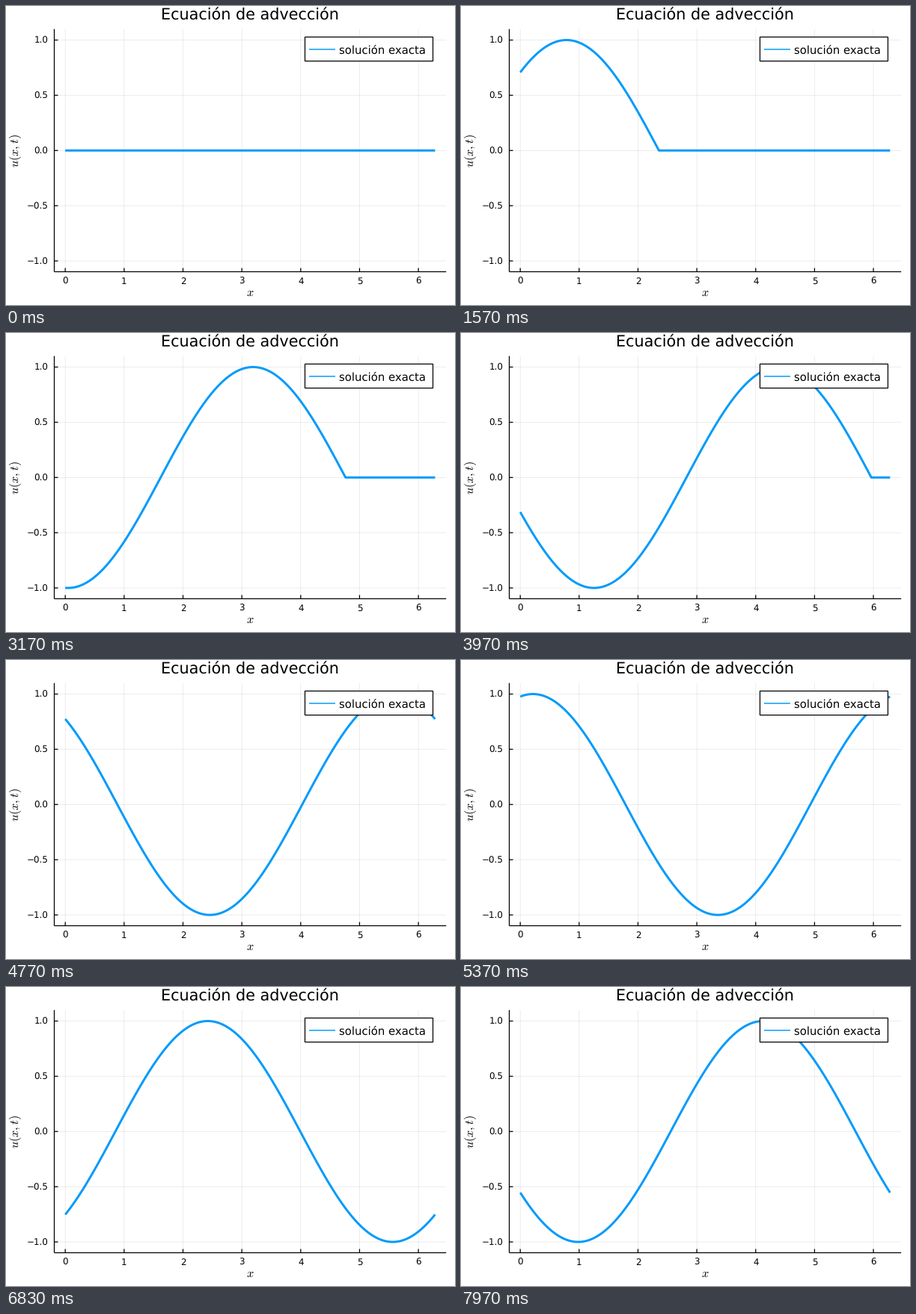
Animation, 600 px wide and 400 px high, one loop 8 s. Source, as a matplotlib script:

```python
import numpy as np
import matplotlib.pyplot as plt
from matplotlib.animation import FuncAnimation
from matplotlib.patches import Rectangle

W, H, DPI = 600, 400, 100
LOOP, TICK = 8000, 20   # ms
STEPS = 240             # time steps of the wave in one loop
DT = 20 / 399
BLUE = "#009afa"
PX = 72 / DPI

plt.rcParams.update({
    "font.family": "DejaVu Sans",
    "mathtext.fontset": "cm",
    "text.hinting": "none",
    "path.simplify": False,
    "path.snap": False,
})

fig = plt.figure(figsize=(W / DPI, H / DPI), dpi=DPI, facecolor="white")
ax = fig.add_axes([0, 0, 1, 1])
ax.set(xlim=(0, W), ylim=(H, 0))
ax.axis("off")

LEFT, RIGHT, TOP, BOTTOM = 64.5, 588.2, 30.8, 355.5
EDGE = 1.25


def sx(x):
    return 79.2 + 78.65 * x


def sy(u):
    return 193.3 - 147.75 * u


def line(xs, ys, color="black", width=EDGE, z=2, **kw):
    return ax.plot(xs, ys, color=color, lw=width * PX, zorder=z,
                   solid_capstyle="butt", **kw)[0]


def grid_line(xs, ys):
    line(xs, ys, width=0.74, z=1, alpha=0.1)


def label(x, y, s, size, ha="center", va="baseline", **kw):
    ax.text(x, y, s, fontsize=size * PX, ha=ha, va=va, zorder=6, **kw)


# grid, ticks and tick labels
for k in range(7):
    x = sx(k)
    grid_line([x, x], [TOP, BOTTOM])
    line([x, x], [BOTTOM, BOTTOM - 5])
    label(x, 372, str(k), 11.85)
for u in (-1.0, -0.5, 0.0, 0.5, 1.0):
    y = sy(u)
    grid_line([LEFT, RIGHT], [y, y])
    line([LEFT, LEFT + 5], [y, y])
    label(56.3, y + 4.4, f"{u:.1f}".replace("-", "\u2212"), 11.85, ha="right")

line([LEFT, RIGHT], [BOTTOM, BOTTOM])
line([LEFT, LEFT], [TOP, BOTTOM])

label(326.3, 18.3, "Ecuación de advección", 20.75)
label(325.8, 388, "$x$", 16.3)
label(13.3, 193.5, "$u(x,t)$", 16.3, va="center", rotation=90)

# legend
ax.add_patch(Rectangle((399.5, 41.5), 171, 32.2, fc="white", ec="black",
                       lw=EDGE * PX, zorder=4))
line([405, 440], [58, 58], BLUE, 1.48, z=5)
label(444.6, 63.4, "solución exacta", 14.85, ha="left")

grid = np.linspace(0, 2 * np.pi, 400)
curve = line([], [], BLUE, 2.96, z=3, solid_joinstyle="round")


def update(i):
    # the wave advances in whole steps, sampled at the middle of each tick
    step = int((i * TICK + 15) * STEPS / LOOP)
    t = step * DT
    x = np.sort(np.append(grid, min(t, 2 * np.pi)))
    curve.set_data(sx(x), sy(np.sin(np.maximum(t - x, 0))))
    return (curve,)


anim = FuncAnimation(fig, update, frames=LOOP // TICK, interval=TICK,
                     repeat=True, repeat_delay=0, blit=False)
plt.show()
```
